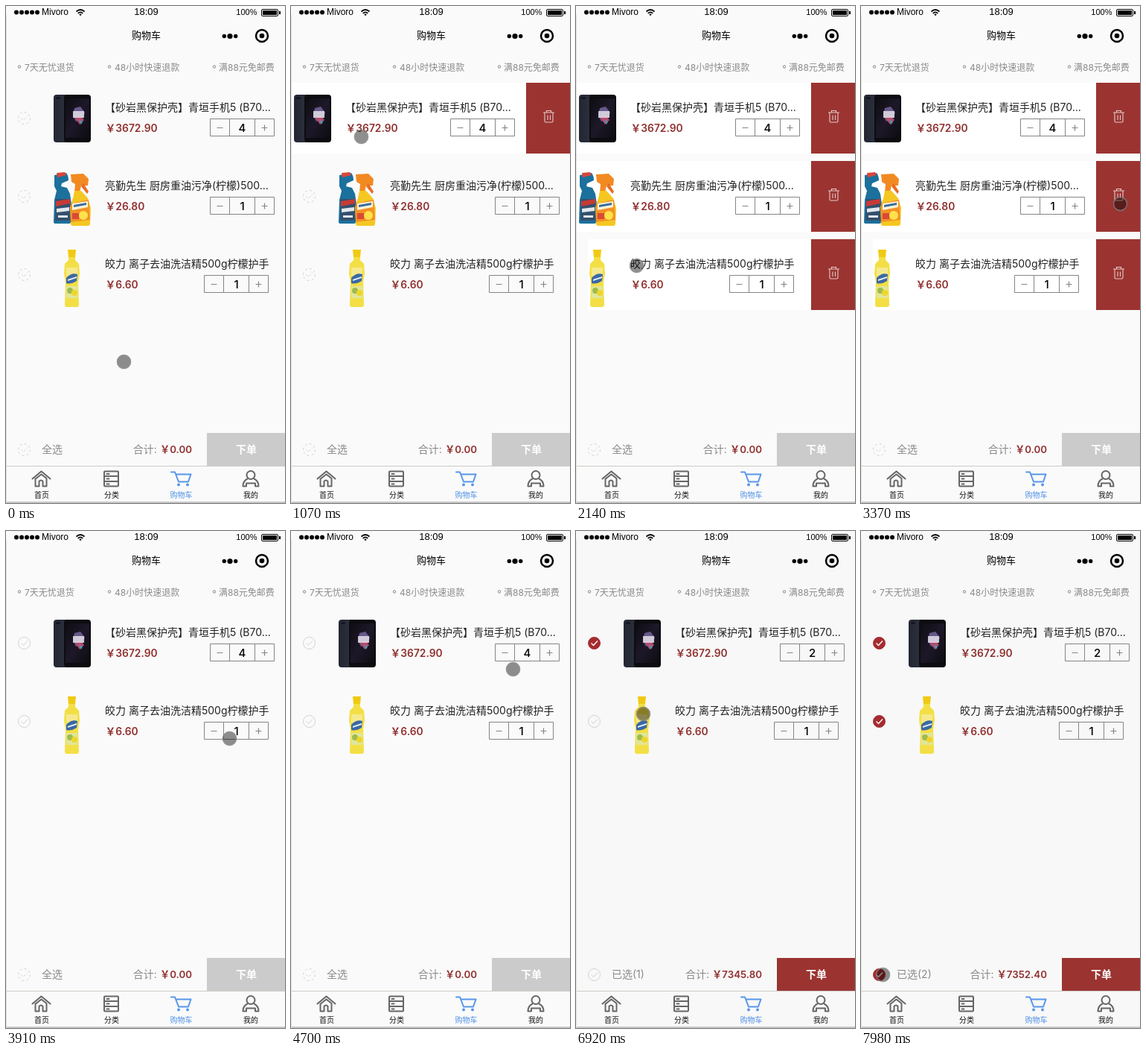
An HTML page that plays this animation: 375 by 667 pixels, repeating every 8000 ms.

```html
<!DOCTYPE html>
<html lang="zh-CN">
<head>
<meta charset="utf-8">
<title>购物车</title>
<style>
  html, body { margin: 0; width: 100%; height: 100%; overflow: hidden; background: #fafafa; }
  svg { display: block; }
  text { font-family: Inter, "Noto Sans CJK SC", "Noto Sans CJK", sans-serif; font-size: 14px; fill: #222; }
  #status text { font-family: "Liberation Sans", sans-serif; fill: #000; }
  .mid { text-anchor: middle; }
  .end { text-anchor: end; }
  .soft, .perk { fill: #8a8a8a; }
  .perk { font-size: 12px; }
  .price { fill: #903130; font-weight: 600; font-size: 13.8px; }
  .qty { font-size: 15px; font-weight: 500; fill: #000; }
  .tab { font-size: 10px; fill: #111; text-anchor: middle; }
  .line { fill: none; stroke: #858585; }
  .icon { fill: none; stroke: #666; stroke-width: 2; stroke-linejoin: round; stroke-linecap: round; }
  .red { fill: #9b3431; }
  .bin { fill: none; stroke: #e6cac8; stroke-width: 1.1; }
  .check circle, .check path { fill: none; stroke: #d2d2d2; }
  .check.faint circle { stroke-dasharray: 3 3.28; }
  .check.faint path { stroke-dasharray: 3 2.5; }
  .check.on circle { fill: #a52c30; stroke: #a52c30; }
  .check.on path { stroke: #fff; stroke-width: 1.4; }
  #cursor circle { fill: rgba(0, 0, 0, .44); }
  #cursor .rim { fill: none; stroke: rgba(150, 150, 150, .65); stroke-width: 1.5; }
</style>
</head>
<body>
<svg width="375" height="667" viewBox="0 0 375 667">
  <defs>
    <linearGradient id="screen" x1="0" y1="0" x2="1" y2="1">
      <stop offset="0" stop-color="#0e0d12"/>
      <stop offset=".5" stop-color="#1d1829"/>
      <stop offset="1" stop-color="#0c0c10"/>
    </linearGradient>
    <linearGradient id="shell">
      <stop offset="0" stop-color="#232632"/>
      <stop offset="1" stop-color="#353a49"/>
    </linearGradient>

    <g id="phone">
      <rect x="64" y="16" width="34" height="64" rx="4" fill="url(#shell)"/>
      <rect x="67" y="19" width="6" height="3" rx="1.5" fill="#15171d"/>
      <rect x="78" y="16" width="36" height="64" rx="4" fill="#0c0c10"/>
      <rect x="80" y="21" width="32" height="53" fill="url(#screen)"/>
      <path d="M92 34l8-2 6 8-3 8-9 4-4-8z" fill="#66588a"/>
      <path d="M92 46l8-2 5 6-6 6z" fill="#b34d6c"/>
      <path d="M90 38h15v9h-15z" fill="#ece8f0" opacity=".8"/>
      <path d="M98 50l5 2-2 4z" fill="#4c9ab8"/>
    </g>

    <g id="cleaners">
      <path d="M65 19l16-3q3 4 3 10l-9 4-1 4 8 2 4 8 2 14-1 24q0 2-2 2H66q-2 0-2-2l1-30 3-12-3-6z" fill="#1c709c"/>
      <path d="M68 16l11-1 2 4-12 3z" fill="#d9473b"/>
      <path d="M67 51h19l1 29H66z" fill="#34506e"/>
      <path d="M67 54l19-3v6l-19 4z" fill="#c83a35"/>
      <path d="M68 64l17-2v5l-17 2zM70 73h13v3H70z" fill="#e1e7ec"/>
      <path d="M87 18l17-1 7 7-1 9h-9l-2 9h-7l1-11-5-3z" fill="#f28a22"/>
      <path d="M104 30l7 11-2 3-8-10z" fill="#e96d22"/>
      <path d="M92 40h9l9 10 4 13-1 21q0 3-3 3H90q-3 0-3-3l-1-22 4-12z" fill="#f5c722"/>
      <path d="M87 57l24-5 2 27-26 3z" fill="#f39127"/>
      <path d="M89 57l21-3v8l-21 4z" fill="#fff3d6"/>
      <path d="M91 59l17-3v3l-17 3z" fill="#356da0"/>
      <circle cx="104" cy="73" r="6" fill="#ffe24a"/>
      <path d="M89 70h9v8h-9z" fill="#d94a35"/>
    </g>

    <g id="soap">
      <path d="M83 14h11l-1 10H84z" fill="#f0ca12"/>
      <path d="M84 24h9v4l5 5 1 13-2 12 1 30q0 3-3 3H82q-3 0-3-3l1-30-2-12 1-13 5-5z" fill="#f3df45"/>
      <path d="M81 38h15v11H81z" fill="#f6e98c"/>
      <path d="M81 52q7-8 15-5l-1 9q-8 5-14 3z" fill="#3b69a5"/>
      <path d="M83 54l12-4v2l-12 4z" fill="#e9f1f5"/>
      <path d="M81 63h15v16H81z" fill="#e0e69a"/>
      <circle cx="86" cy="69" r="4" fill="#9dbb4d"/>
      <circle cx="92" cy="72" r="4" fill="#efd52b"/>
    </g>

    <path id="trash" class="bin" d="M339 40h15M343.500 40v-2.500h6V40M341 40.500v11q0 1.500 1.500 1.500h8q1.500 0 1.500-1.500v-11M345 43.500v6.500M348.500 43.500v6.500"/>
  </defs>

  <rect id="page" width="375" height="667" fill="#fafafa"/>

  <g id="status">
    <circle cx="14" cy="8.500" r="3"/><circle cx="21" cy="8.500" r="3"/><circle cx="28" cy="8.500" r="3"/>
    <circle cx="35" cy="8.500" r="3"/><circle cx="42" cy="8.500" r="3"/>
    <text x="48" y="12" style="font-size:12px">Mivoro</text>
    <g fill="none" stroke="#000" stroke-width="1.7">
      <path d="M94.500 7.500q5.500-5 11 0M96.700 9.800q3.300-3 6.600 0"/>
    </g>
    <path d="M98.300 11.300q1.700-1.400 3.400 0L100 13.200z"/>
    <text class="mid" x="188.500" y="12" style="font-size:13px">18:09</text>
    <text class="end" x="337.500" y="12" style="font-size:11px">100%</text>
    <rect x="343.500" y="4.500" width="22" height="9" rx="1.500" fill="none" stroke="#000"/>
    <path d="M345 6h19v6h-19zM367 7h2v4h-2z"/>
  </g>

  <text class="mid" x="188.500" y="44" style="font-size:13px;fill:#000">购物车</text>
  <circle cx="293.300" cy="40.500" r="2.700"/><circle cx="301" cy="40.500" r="3.600"/><circle cx="308.700" cy="40.500" r="2.700"/>
  <circle cx="344" cy="40" r="8" fill="none" stroke="#000" stroke-width="2.500"/><circle cx="344" cy="40" r="3.300"/>

  <g class="line">
    <circle cx="18" cy="81.500" r="1.700"/><circle cx="139" cy="81.500" r="1.700"/><circle cx="280" cy="81.500" r="1.700"/>
  </g>
  <text class="perk" x="25" y="87">7天无忧退货</text>
  <text class="perk" x="146" y="87">48小时快速退款</text>
  <text class="perk" x="286" y="87">满88元免邮费</text>

  <g id="rows"></g>

  <g id="all" transform="translate(24.500 595.500)"></g>
  <text id="picked" class="soft" x="48" y="600"></text>
  <text class="soft end" x="250" y="600">合计:<tspan id="sum" class="price" dx="4" style="font-size:13.300px"></tspan></text>
  <rect id="order" x="270" y="573" width="105" height="44"/>
  <text class="mid" x="323" y="600" style="fill:#fff;font-weight:700">下单</text>

  <path d="M0 617.500h375" stroke="#cfcbc6"/>
  <path d="M0 666h375" stroke="#c9c9c9" stroke-width="2"/>
  <g class="icon">
    <path d="M35.500 634.500l12-10 12 10M39.500 634.500v10h5v-6.500q2.500-3 5 0v6.500h5v-10M40.500 634l7-5.500 7 5.500"/>
    <path d="M133 624.500h17q1 0 1 1v18q0 1-1 1h-17q-1 0-1-1v-18q0-1 1-1zM132 631h19M132 638h19M135.500 628h3M135.500 634.500h3M135.500 641.500h3"/>
    <path d="M222 625.500h5l5 13h13l3.500-10H229" stroke="#5796ea"/>
    <path d="M318.500 644.500q0-7 6-10M339.500 644.500q0-7-6-10M318.500 644.500h4.500v-3M339.500 644.500H335v-3M323 640.500h12"/>
    <circle cx="329" cy="629.500" r="5.500"/>
  </g>
  <circle cx="232" cy="642.500" r="2" fill="#5796ea"/><circle cx="244" cy="642.500" r="2" fill="#5796ea"/>
  <text class="tab" x="48" y="660">首页</text>
  <text class="tab" x="142" y="660">分类</text>
  <text class="tab" x="235.500" y="660" style="fill:#4c8fe8">购物车</text>
  <text class="tab" x="329" y="660">我的</text>
  <path d="M.5 12v655" stroke="#e7e4de"/>

  <g id="cursor"><circle cx=".5" cy=".5" r="9.700"/><circle class="rim" cx=".5" cy=".5" r="9"/></g>
</svg>

<script>
const LOOP = 8000, TICK = 88.67;   // the screen refreshes once per TICK ms
const REMOVE = 40, FIRST = 64, SECOND = 72, BOTH = 83;
const TICK_MARK = '<circle r="8"/><path d="M-4 0l3 3 5.5-6"/>';

// open: ticks between which the row slides aside; right: edge of the stepper
const items = [
  { art: 'phone', name: '【砂岩黑保护壳】青垣手机5 (B70...', price: 3672.9, qty: 4, right: 361, left: 1, open: [9, 12] },
  { art: 'cleaners', name: '亮勤先生 厨房重油污净(柠檬)500...', price: 26.8, qty: 1, right: 361, left: 1, open: [16, 19] },
  { art: 'soap', name: '皎力 离子去油洗洁精500g柠檬护手', price: 6.6, qty: 1, right: 353, left: 16, open: [22, 24] }
];

// [tick, x, y]
const path = [
  [2, 158, 477], [3, 161, 469], [5, 190, 405], [7, 215, 290], [8, 217, 212], [9, 222, 190],
  [10, 190, 180], [11, 135, 177], [12, 94, 175], [13, 110, 190], [15, 225, 255], [16, 232, 263],
  [18, 115, 270], [20, 95, 278], [22, 200, 341], [24, 81, 348], [28, 190, 328], [32, 298, 292],
  [34, 335, 275], [36, 359, 266], [38, 348, 265], [40, 348, 265], [42, 344, 287], [44, 300, 278],
  [46, 245, 258], [48, 206, 212], [49, 224, 203], [50, 310, 193], [52, 310, 193], [53, 298, 185],
  [56, 350, 182], [57, 364, 178], [61, 287, 171], [67, 287, 171], [68, 287, 165], [69, 287, 161],
  [71, 287, 161], [74, 245, 185], [78, 90, 245], [81, 28, 257], [82, 28, 257], [84, 30, 350],
  [86, 45, 600], [87, 45, 600], [90, 29, 595]
];

const $ = id => document.getElementById(id);
const yuan = n => '￥' + n.toFixed(2);
const ramp = (k, a, b) => Math.min(1, Math.max(0, (k - a) / (b - a)));
const move = (el, x, y) => el.setAttribute('transform', `translate(${x} ${y})`);
const mark = (el, state) => el.setAttribute('class', 'check ' + state);

function rowMarkup({ art, name, price, right, left }) {
  const x = right - 86.5;
  return `<g class="row">
    <rect class="paper" x="${left}" width="${375 - left}" height="95" fill="#fff"/>
    <g class="body">
      <g class="check" transform="translate(24.500 47.500)">${TICK_MARK}</g>
      <use href="#${art}"/>
      <text x="133" y="38">${name}</text>
      <text class="price" x="133.500" y="66">${yuan(price)}</text>
      <path class="line" d="M${x} 48.500h86v23h-86zM${x + 26} 48.500v23M${x + 60} 48.500v23"/>
      <path class="line" d="M${x + 9} 60.500h8M${x + 69} 60.500h8M${x + 73} 56.500v8" stroke-width="1.200"/>
      <text class="qty mid" x="${x + 43}" y="65.500"></text>
    </g>
    <g class="drop"><rect class="red" x="316" width="59" height="95"/><use href="#trash"/></g>
  </g>`;
}

$('all').innerHTML = TICK_MARK;
$('rows').innerHTML = items.map(rowMarkup).join('');
const rows = [...document.querySelectorAll('.row')].map(el => {
  const part = name => el.querySelector('.' + name);
  return { el, paper: part('paper'), body: part('body'), drop: part('drop'), check: part('check'), qty: part('qty') };
});

function cursorAt(k) {
  const i = path.findIndex(p => p[0] >= k);
  if (i <= 0) return i < 0 ? path[path.length - 1].slice(1) : path[0].slice(1);
  const [a, b] = [path[i - 1], path[i]], u = ramp(k, a[0], b[0]);
  return [1, 2].map(n => Math.round(a[n] + (b[n] - a[n]) * u));
}

function drawRow(row, i, k, qty, on) {
  const { open } = items[i], removed = k >= REMOVE;
  const slide = (1 - (1 - ramp(k, ...open)) ** 2) * (1 - ramp(k, REMOVE - 1, REMOVE + 2));
  row.el.style.display = removed && i === 1 ? 'none' : '';
  move(row.el, 0, 103 + 105 * (removed && i === 2 ? 1 : i));
  move(row.body, -60 * slide, 0);
  move(row.drop, 60 - 60 * slide, 0);
  row.paper.style.display = slide > 0 ? '' : 'none';
  mark(row.check, on ? 'on' : removed ? '' : 'faint');
  row.qty.textContent = qty;
}

function draw(k) {
  const qty = items.map(item => item.qty);
  qty[0] -= (k >= FIRST) + (k >= SECOND);
  const on = [k >= FIRST, false, k >= BOTH];
  const count = on.filter(Boolean).length;
  const sum = items.reduce((s, item, i) => s + (on[i] ? item.price * qty[i] : 0), 0);

  rows.forEach((row, i) => drawRow(row, i, k, qty[i], on[i]));
  $('page').setAttribute('fill', count ? '#f8f8f8' : '#fafafa');
  mark($('all'), count > 1 ? 'on' : count ? '' : 'faint');
  $('picked').textContent = count ? `已选(${count})` : '全选';
  $('sum').textContent = yuan(sum);
  $('order').setAttribute('fill', count ? '#9b3431' : '#cbcbcb');
  move($('cursor'), ...cursorAt(k));
}

let last = -1;
function frame() {
  const k = Math.floor((performance.now() % LOOP + 8) / TICK);
  if (k !== last) draw(last = k);
  requestAnimationFrame(frame);
}
frame();
</script>
</body>
</html>
```
